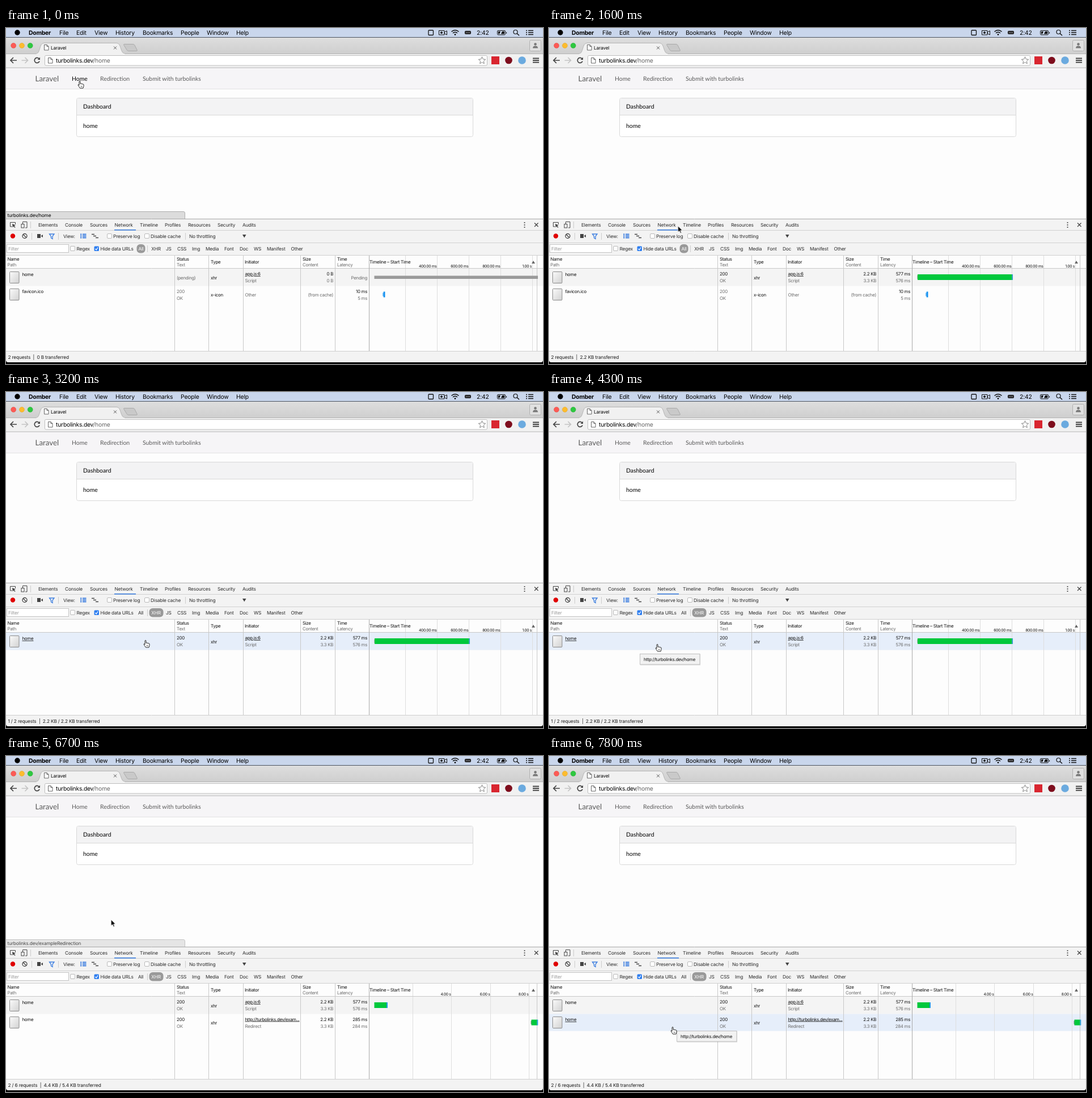
An HTML page for the animation above (8 s loop, 947 by 592 pixels).

```html
<!DOCTYPE html>
<html lang="en">
<head>
<meta charset="utf-8">
<title>Network panel</title>
<style>
html, body { margin: 0; width: 100%; height: 100%; overflow: hidden; background: #000; }
svg { display: block; width: 947px; height: 592px; font: 8.3px Inter, sans-serif; letter-spacing: -.17px; text-rendering: geometricPrecision; }
text { white-space: pre; }
.menu { font-size: 10.4px; letter-spacing: -.2px; }
.page { font: 10.4px Lato, sans-serif; letter-spacing: 0; }
.url { font-size: 10.3px; letter-spacing: -.2px; }
.grid { font-size: 7.9px; letter-spacing: -.3px; fill: #111; }
.axis { font-size: 6.8px; letter-spacing: -.35px; text-anchor: end; }
.r { text-anchor: end; }
.m { text-anchor: middle; }
.g { fill: #6c6c6c; }
.u { text-decoration: underline; }
.line { fill: none; stroke: #444; }

/* parts that are shown only for some of the loop */
.w { opacity: 0; animation: var(--k) 8s step-end infinite; }
@keyframes pending { 0% { opacity: 1 } 5% { opacity: 0 } }
@keyframes loaded { 5%, 100% { opacity: 1 } }
@keyframes all { 0% { opacity: 1 } 27.5% { opacity: 0 } }
@keyframes xhr { 27.5%, 100% { opacity: 1 } }
@keyframes sumFull { 5% { opacity: 1 } 27.5% { opacity: 0 } }
@keyframes sumXhr { 27.5% { opacity: 1 } 83.75% { opacity: 0 } }
@keyframes near { 0% { opacity: 1 } 83.75% { opacity: 0 } }
@keyframes far { 83.75%, 100% { opacity: 1 } }
@keyframes over1 { 35% { opacity: 1 } 62.5% { opacity: 0 } 87.3% { opacity: 1 } 88.2% { opacity: 0 } }
@keyframes over2 { 88.2%, 100% { opacity: 1 } }
@keyframes tip1 { 45.6% { opacity: 1 } 61.1% { opacity: 0 } }
@keyframes tip2 { 96.6%, 100% { opacity: 1 } }
@keyframes hand { 0% { opacity: 1 } 6% { opacity: 0 } 35% { opacity: 1 } 62.5% { opacity: 0 } 68% { opacity: 1 } 80% { opacity: 0 } 87.3%, 100% { opacity: 1 } }
@keyframes arrow { 6% { opacity: 1 } 35% { opacity: 0 } 62.5% { opacity: 1 } 68% { opacity: 0 } 80% { opacity: 1 } 87.3%, 100% { opacity: 0 } }

/* hovered links darken */
.lit { animation: var(--k) 8s step-end infinite; }
@keyframes onHome { 0% { fill: #000 } 6% { fill: #5a5a5a } }
@keyframes onRedir { 68% { fill: #000 } 80% { fill: #5a5a5a } }

/* status bubbles fade out */
.fade { animation-timing-function: linear; }
@keyframes bubble1 { 0%, 9% { opacity: 1 } 11.6%, 100% { opacity: 0 } }
@keyframes bubble2 { 0%, 68.3% { opacity: 0 } 68.6%, 83% { opacity: 1 } 85.6%, 100% { opacity: 0 } }

.bar { opacity: 0; animation: bar 8s linear infinite; }
@keyframes bar {
  0%, 85% { opacity: 0; transform: scaleX(0) }
  85.1% { opacity: 1; transform: scaleX(.02) }
  88.75% { opacity: 1; transform: scaleX(.733) }
  91.25% { opacity: 1; transform: scaleX(1) }
  93%, 100% { opacity: 0; transform: scaleX(1) }
}
.cursor { animation: move 8s ease-in-out infinite; }
@keyframes move {
  0% { transform: translate(129px, 92px) }
  4% { transform: translate(131px, 95px) }
  11.25% { transform: translate(172px, 273px) }
  26%, 31% { transform: translate(256px, 388px) }
  33.75% { transform: translate(256px, 406px) }
  37.5%, 40% { transform: translate(245px, 436px) }
  46%, 61% { transform: translate(190px, 443px) }
  68.75%, 78.5% { transform: translate(182px, 93px) }
  88.6% { transform: translate(188px, 457px) }
  96%, 100% { transform: translate(217px, 476px) }
}
</style>
</head>
<body>
<svg viewBox="0 0 947 592">
<defs>
  <linearGradient id="strip" x2="0" y2="1"><stop stop-color="#dedede"/><stop offset="1" stop-color="#cecece"/></linearGradient>
  <linearGradient id="thumb" x2="1" y2="1"><stop stop-color="#fafafa"/><stop offset="1" stop-color="#d2d2d2"/></linearGradient>
  <path id="file" d="M.5.5h4.500l3 3v6.500h-7.500zM5 .5v3h3" fill="#fff" stroke="#555" stroke-width=".9"/>
  <rect id="box" width="8" height="8" rx="1.500" fill="#fff" stroke="#aaa" stroke-width=".8"/>
  <rect id="icon" x="6.500" y="429.500" width="16.500" height="20" rx="1" fill="url(#thumb)" stroke="#8a8a8a"/>
</defs>

<!-- menu bar -->
<rect width="947" height="17" fill="#c9d6ec"/>
<rect y="16" width="947" height="1" fill="#4c535f"/>
<g class="menu">
  <circle cx="20" cy="8" r="4.700"/>
  <text x="40" y="12" font-weight="700">Domber</text>
  <text x="94" y="12">File</text><text x="124" y="12">Edit</text><text x="156" y="12">View</text>
  <text x="193" y="12">History</text><text x="241" y="12">Bookmarks</text><text x="308" y="12">People</text>
  <text x="354" y="12">Window</text><text x="406" y="12">Help</text><text x="830" y="12">2:42</text>
</g>
<g fill="none" stroke="#111">
  <rect x="745" y="4" width="8.500" height="8.500" rx="1" stroke-width="1.300"/>
  <path d="M763.500 4.500h9.500v7.500h-9.500zM773.500 7l4-2v7l-4-2z"/>
  <circle cx="768" cy="8.200" r="1.500" fill="#111"/>
  <path d="M785.500 6.500q6.500-5.500 13 0M788 9q4-3.500 8 0" stroke-width="1.500"/>
  <circle cx="792" cy="11.500" r="1" fill="#111"/>
  <rect x="809.500" y="5.500" width="10" height="5" rx="1" fill="#333"/>
  <path d="M811 7.500h7M811 9h7" stroke="#aab" stroke-width=".6" stroke-dasharray="1 1"/>
  <rect x="866.500" y="4.500" width="14" height="7.500" rx="1.500"/>
  <path d="M868 6h4l-2 4.500h-2zM875 6h4v4.500h-6z" fill="#111" stroke="none"/>
  <path d="M882.500 7v3"/>
  <circle cx="898.500" cy="7" r="3.500" stroke-width="1.200"/><path d="M901 9.500l4 3.700" stroke-width="1.500"/>
  <path d="M917 4.500h2M917 8h2M917 11.500h2M921 4.500h9M921 8h9M921 11.500h9" stroke-width="1.400"/>
</g>

<!-- tab strip and toolbar -->
<rect y="17" width="947" height="29" fill="url(#strip)"/>
<rect y="45" width="947" height="25" fill="#f1f1f1"/>
<path d="M0 45.500H53C61 45 58 26.500 67 26.500H195C204 26.500 201 45 210 45.500H947" fill="#f1f1f1" stroke="#b4b4b4"/>
<rect x="54" y="45" width="155" height="2" fill="#f1f1f1"/>
<g stroke-width=".5">
  <circle cx="13.200" cy="31" r="4.500" fill="#fc5b55" stroke="#e0443e"/>
  <circle cx="28" cy="31" r="4.500" fill="#fdbc2e" stroke="#dfa023"/>
  <circle cx="42.700" cy="31" r="4.500" fill="#2ec840" stroke="#1aab29"/>
</g>
<use href="#file" x="67" y="29"/>
<text x="79" y="38">Laravel</text>
<path d="M190 32.500l5 5M195 32.500l-5 5" stroke="#555"/>
<path d="M208 28.500h16q2 0 3 2l4 8q1 2-1 2h-14q-2 0-3-2l-5-8q-1-2 0-2z" fill="#c9c9c9" stroke="#aaa"/>
<rect x="923.500" y="21.500" width="20" height="19" rx="2" fill="#e0e0e0" stroke="#b0b0b0"/>
<circle cx="933.500" cy="28.500" r="2.300" fill="#777"/><path d="M929 35.500q0-4 4.500-4t4.500 4z" fill="#777"/>
<rect y="69.500" width="947" height="1" fill="#bcbcbc"/>
<g fill="none" stroke="#444" stroke-width="1.700">
  <path d="M19 57H8.500M13 52l-5 5 5 5"/>
  <path d="M27.500 57H38M33.500 52l5 5-5 5" stroke="#c4c4c4"/>
  <path d="M58 53.800a4.500 4.500 0 1 0 1 4.700"/><path d="M60 51.500v4.500h-4.500z" fill="#444" stroke="none"/>
  <path d="M929 53.500h11M929 57h11M929 60.500h11" stroke-width="1.900"/>
</g>
<rect x="68.500" y="48.500" width="780" height="17.500" rx="2" fill="#fff" stroke="#bdbdbd"/>
<use href="#file" x="74" y="52"/>
<text class="url" x="88" y="61">turbolinks.dev<tspan fill="#666">/home</tspan></text>
<path d="M839.500 50.800l1.800 4.100 4.400.4-3.300 3 .9 4.400-3.800-2.300-3.800 2.300.9-4.400-3.300-3 4.400-.4z" fill="#fff" stroke="#777" stroke-width=".9"/>
<rect x="856" y="50" width="14" height="14" fill="#d92630"/>
<circle cx="886.500" cy="57" r="6.300" fill="#7e0d1d"/>
<circle cx="910" cy="57" r="6.800" fill="#6baadf"/>

<!-- page -->
<rect y="70.500" width="947" height="266" fill="#fdfdfd"/>
<rect y="70.500" width="947" height="37" fill="#f6f5f7"/>
<rect y="107" width="947" height="1" fill="#e3e3e3"/>
<rect class="bar" y="70" width="947" height="2.700" fill="#1f6cc8"/>
<g class="page">
  <text x="51.500" y="94" font-size="13.4" fill="#5a5a5a">Laravel</text>
  <g fill="#5a5a5a">
    <text class="lit" style="--k:onHome" x="116" y="92.500">Home</text>
    <text class="lit" style="--k:onRedir" x="166" y="92.500">Redirection</text>
    <text x="241" y="92.500">Submit with turbolinks</text>
  </g>
  <rect x="124.500" y="123.500" width="699" height="68" rx="3" fill="#fff" stroke="#d8d8d8"/>
  <path d="M125 153v-27q0-2 2-2h694q2 0 2 2v27z" fill="#f3f3f4"/>
  <path d="M125 153.500h698" stroke="#d8d8d8"/>
  <text x="136" y="142">Dashboard</text><text x="136" y="176">home</text>
</g>
<g class="w fade" style="--k:bubble1"><path d="M-1 323.500h314q2.500 0 2.500 2.500v10.500h-317z" fill="#dcdcdc" stroke="#adadad"/><text x="2.500" y="332.500">turbolinks.dev/home</text></g>
<g class="w fade" style="--k:bubble2"><path d="M-1 323.500h314q2.500 0 2.500 2.500v10.500h-317z" fill="#dcdcdc" stroke="#adadad"/><text x="2.500" y="332.500">turbolinks.dev/exampleRedirection</text></g>

<!-- developer tools: toolbars -->
<rect y="336" width="947" height="65" fill="#f3f3f3"/>
<path d="M0 336.500h947" stroke="#a8a8a8"/>
<path d="M0 356.500h947M0 378.500h947M0 400.500h947" stroke="#d0d0d0"/>
<rect x="191" y="355" width="38" height="1.700" fill="#4482dd"/>
<g class="line">
  <path d="M11 350H7.500V342.500H16.500V346"/><path d="M11 345l6 2.500-2.500 1 2 2.500-1 1-2-2.500-1.500 2z" fill="#444" stroke="none"/>
  <path d="M29.500 345v-3.500h7.500v10.500h-3"/><rect x="27" y="345.500" width="5" height="6.500"/>
  <path d="M43.500 341v12M45.500 361v12M92.500 361v12M316.500 361v12M249.500 383v12" stroke="#ccc"/>
  <path d="M932 343.500l6.500 6.500M938.500 343.500l-6.500 6.500" stroke-width="1.300"/>
</g>
<g fill="#444"><circle cx="914.500" cy="343" r="1.100"/><circle cx="914.500" cy="347" r="1.100"/><circle cx="914.500" cy="351" r="1.100"/></g>
<g fill="#2a2a2a">
  <text x="57" y="350">Elements</text><text x="104" y="350">Console</text><text x="148" y="350">Sources</text>
  <text x="191.500" y="350">Network</text><text x="236" y="350">Timeline</text><text x="280" y="350">Profiles</text>
  <text x="321" y="350">Resources</text><text x="373" y="350">Security</text><text x="417" y="350">Audits</text>
  <text x="101" y="370">View:</text><text x="189" y="370">Preserve log</text><text x="255" y="370">Disable cache</text><text x="323" y="370">No throttling</text>
</g>
<circle cx="12" cy="366.500" r="4.200" fill="#e00000"/>
<g class="line" stroke-width="1.300">
  <circle cx="33" cy="366.500" r="4"/><path d="M30.200 363.700l5.600 5.600"/>
  <path d="M55 363h6v7h-6zM61.500 366.500l3.500-2.500v5z" fill="#444" stroke="none"/>
  <path d="M76.500 363h8.500l-3 4v4.500l-2.500-1.500v-3z" stroke="#3b7de0"/>
  <path d="M131 363.500h2.500M131 366.500h2.500M131 369.500h2.500M135 363.500h6.500M135 366.500h6.500M135 369.500h6.500" stroke="#3b7de0" stroke-width="1.800"/>
  <path d="M151 363.500h5M154 366.500h5M158 369.500h5" stroke-width="1.700"/>
</g>
<path d="M417 364h6.500l-3.250 5.500z" fill="#444"/>
<use href="#box" x="178.500" y="362.500"/><use href="#box" x="244.500" y="362.500"/>
<rect x="1.500" y="381.500" width="109" height="14" fill="#fff" stroke="#c4c4c4"/>
<text x="4" y="392" fill="#999">Filter</text>
<use href="#box" x="113.500" y="384.500"/>
<rect x="155.500" y="384.500" width="8.500" height="8.500" rx="1.500" fill="#2f7ff0"/><path d="M157.500 389l1.700 2 3-4.500" fill="none" stroke="#fff" stroke-width="1.200"/>
<g fill="#2a2a2a">
  <text x="124.500" y="392">Regex</text><text x="166.500" y="392">Hide data URLs</text>
  <text class="m" x="237.500" y="392">All</text><text class="m" x="264.500" y="392">XHR</text>
  <text x="282" y="392">JS</text><text x="302" y="392">CSS</text><text x="328" y="392">Img</text><text x="352" y="392">Media</text>
  <text x="385" y="392">Font</text><text x="412" y="392">Doc</text><text x="437" y="392">WS</text><text x="460" y="392">Manifest</text><text x="502.500" y="392">Other</text>
</g>
<g class="w" style="--k:all"><rect x="230.500" y="381" width="15" height="15.500" rx="6" fill="#999"/><text class="m" x="238" y="392" fill="#fff">All</text></g>
<g class="w" style="--k:xhr"><rect x="252.500" y="381" width="25" height="15.500" rx="6" fill="#999"/><text class="m" x="264.500" y="392" fill="#fff">XHR</text></g>

<!-- request grid -->
<rect y="401" width="947" height="169" fill="#fdfdfd"/>
<rect y="424" width="947" height="30.500" fill="#f4f4f4"/>
<rect class="w" style="--k:over1" y="424" width="947" height="30.500" fill="#e6eefa"/>
<rect class="w" style="--k:over2" y="454.500" width="947" height="30" fill="#e6eefa"/>
<path class="w" style="--k:near" d="M704.500 401v169M760.500 401v169M816.500 401v169M872.500 401v169M928.500 401v169" stroke="#dedede"/>
<path class="w" style="--k:far" d="M717.500 401v169M785.500 401v169M854.500 401v169M922.500 401v169" stroke="#dedede"/>
<path d="M297.500 401v169M357.500 401v169M418.500 401v169M519.500 401v169M580.500 401v169M936.500 401v169M0 423.500h947" stroke="#c8c8c8"/>
<path d="M640.500 401v169" stroke="#aaa"/>
<g class="grid">
  <text x="2.500" y="410">Name</text><text class="g" x="2.500" y="420">Path</text>
  <text x="301" y="410">Status</text><text class="g" x="301" y="420">Text</text>
  <text x="361" y="415">Type</text><text x="421" y="415">Initiator</text>
  <text x="523" y="410">Size</text><text class="g" x="523" y="420">Content</text>
  <text x="584" y="410">Time</text><text class="g" x="584" y="420">Latency</text>
  <text x="641" y="415">Timeline – Start Time</text>
  <path d="M927 415h6l-3-5z" fill="#666"/>
  <g class="axis w" style="--k:near"><text x="759.500" y="422">400.00 ms</text><text x="815.500" y="422">600.00 ms</text><text x="871.500" y="422">800.00 ms</text><text x="927" y="422">1.00 s</text></g>
  <g class="axis w" style="--k:far"><text x="784.500" y="422">4.00 s</text><text x="853.500" y="422">6.00 s</text><text x="921.500" y="422">8.00 s</text></g>

  <use href="#icon"/>
  <text x="28.500" y="437">home</text>
  <path class="w" style="--k:over1" d="M28.500 438.500h20" stroke="#222" stroke-width=".8"/>
  <text x="361" y="443">xhr</text><text class="u" x="421.500" y="436">app.js:6</text><text class="g" x="421.500" y="448">Script</text>
  <g class="w" style="--k:pending">
    <text class="g" x="301" y="443">(pending)</text>
    <text class="r" x="577" y="436">0 B</text><text class="g r" x="577" y="448">0 B</text><text class="g r" x="637" y="443">Pending</text>
    <rect x="649.500" y="436.500" width="288.500" height="5.500" fill="#9a9a9a"/>
  </g>
  <g class="w" style="--k:loaded">
    <text x="301" y="436">200</text><text class="g" x="301" y="448">OK</text>
    <text class="r" x="577" y="436">2.2 KB</text><text class="g r" x="577" y="448">3.3 KB</text>
    <text class="r" x="637" y="436">577 ms</text><text class="g r" x="637" y="448">576 ms</text>
    <g class="w" style="--k:near"><rect x="649.500" y="436" width="2" height="6" fill="#888"/><rect x="650" y="434" width="166.500" height="10" fill="#00c83c"/><rect x="816.500" y="434" width="1.500" height="10" fill="#1f8fd0"/></g>
  </g>

  <g class="w" style="--k:all">
    <use href="#icon" y="30"/>
    <text x="28.500" y="467">favicon.ico</text><text class="g" x="301" y="466.500">200</text><text class="g" x="301" y="478.500">OK</text>
    <text x="361" y="473">x-icon</text><text class="g" x="421.500" y="473">Other</text><text class="g r" x="577" y="473">(from cache)</text>
    <text class="r" x="637" y="466.500">10 ms</text><text class="g r" x="637" y="478.500">5 ms</text>
    <rect x="664" y="466.500" width="2" height="6" fill="#7cc0f5"/><rect x="665.700" y="464.500" width="2.800" height="10" fill="#1592f0"/>
  </g>

  <g class="w" style="--k:far">
    <rect x="649.500" y="434" width="21.500" height="10" fill="#00c83c"/><rect x="671" y="434" width="2" height="10" fill="#1f9be0"/>
    <use href="#icon" y="30"/>
    <text x="28.500" y="467">home</text>
    <path class="w" style="--k:over2" d="M28.500 468.500h20" stroke="#222" stroke-width=".8"/>
    <text x="301" y="466.500">200</text><text class="g" x="301" y="478.500">OK</text><text x="361" y="473">xhr</text>
    <text class="u" x="421.500" y="466.500">http://turbolinks.dev/exam...</text><text class="g" x="421.500" y="478.500">Redirect</text>
    <text class="r" x="577" y="466.500">2.2 KB</text><text class="g r" x="577" y="478.500">3.3 KB</text>
    <text class="r" x="637" y="466.500">285 ms</text><text class="g r" x="637" y="478.500">284 ms</text>
    <rect x="925.500" y="466.500" width="2" height="6" fill="#888"/><rect x="926.500" y="464.500" width="10" height="10" fill="#00c83c"/><rect x="936.500" y="464.500" width="1.700" height="10" fill="#1f9be0"/>
  </g>
</g>

<!-- summary line -->
<path d="M0 570h947v15q0 4-4 4h-939q-4 0-4-4z" fill="#f3f3f3"/>
<path d="M0 569.500h947" stroke="#cfcfcf"/>
<g fill="#1a1a1a">
  <text class="w" style="--k:pending" x="3.500" y="583">2 requests  |  0 B transferred</text>
  <text class="w" style="--k:sumFull" x="3.500" y="583">2 requests  |  2.2 KB transferred</text>
  <text class="w" style="--k:sumXhr" x="3.500" y="583">1 / 2 requests  |  2.2 KB / 2.2 KB transferred</text>
  <text class="w" style="--k:far" x="3.500" y="583">2 / 6 requests  |  4.4 KB / 5.4 KB transferred</text>
</g>

<!-- tooltips -->
<g class="grid" stroke-width=".9">
  <g class="w" style="--k:tip1"><rect x="161" y="462" width="106" height="19.500" fill="#000" opacity=".12"/><rect x="160.500" y="461.500" width="105.500" height="18.500" fill="#f2f2f2" stroke="#bbb"/><text x="167" y="473.500">http://turbolinks.dev/home</text></g>
  <g class="w" style="--k:tip2"><rect x="226" y="485" width="106" height="19.500" fill="#000" opacity=".12"/><rect x="225.500" y="484.500" width="105.500" height="18.500" fill="#f2f2f2" stroke="#bbb"/><text x="232" y="496.500">http://turbolinks.dev/home</text></g>
</g>

<g class="cursor" stroke-linejoin="round">
  <path class="w" style="--k:arrow" d="M0 0v11l2.600-2.300 1.800 4 1.900-.8-1.800-3.900h3.500z" fill="#000" stroke="#fff" stroke-width=".9"/>
  <g class="w" style="--k:hand" transform="translate(1 1)" stroke="#111" stroke-width=".9">
    <path d="M-1 1.200q1-1.700 2 0v4.100q1-1 2 .2 1-.7 2 .4 1.500-.5 2 1v2.600l-1 3.500h-5.500l-3-4.500q-1.200-2 .3-1.700l1.200 1.200z" fill="#fff"/>
    <path d="M2.300 8.800v2.400M4 8.800v2.400" stroke-width=".6"/>
  </g>
</g>
</svg>
</body>
</html>
```
